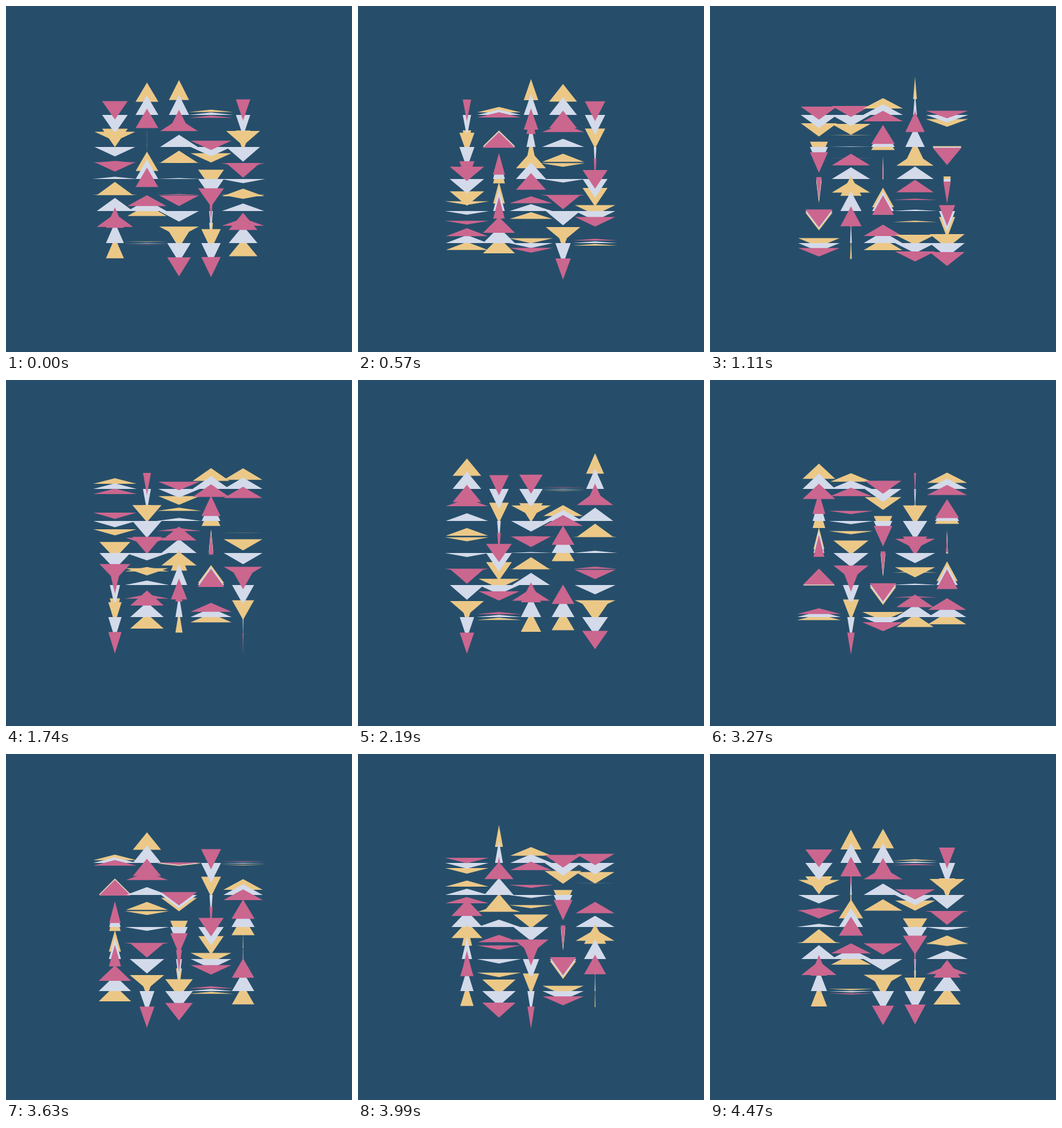
Recreate the animation shown at these times as an HTML page with a canvas. Size 540 by 540 pixels, loop 4500 ms.

```html
<!DOCTYPE html>
<html lang="en">
<head>
<meta charset="utf-8">
<title>Turning triangles</title>
<style>
  html, body { margin: 0; width: 100%; height: 100%; overflow: hidden; background: #264e6a; }
  canvas { display: block; }
</style>
</head>
<body>
<canvas id="stage" width="540" height="540"></canvas>
<script>
const ctx = document.getElementById('stage').getContext('2d');
const LOOP = 4500, GRID = 5, STEP = 50, FIRST = 170;
const RADIUS = 35, SPREAD = 25;
const COLORS = ['#ecc887', '#d3daea', '#cb668f'];
const rad = deg => deg * Math.PI / 180;

// Phases: each column leads by whole radians, each row by a fixed angle.
const COLUMN = [-3, -1, 0, 1, 3];
const START = rad(116.8), ROW_TURN = rad(30.4);
const SHIFT_START = rad(-4.5), ROW_SHIFT = rad(137.25);

function triangle(x, y, half, height, color) {
  ctx.fillStyle = color;
  ctx.beginPath();
  ctx.moveTo(x - half, y);
  ctx.lineTo(x + half, y);
  ctx.lineTo(x, y - height);
  ctx.fill();
}

function cell(col, row, turn) {
  const x = FIRST + col * STEP, y = FIRST + row * STEP;
  const angle = START + COLUMN[col] + row * ROW_TURN - turn;
  const shift = SPREAD * Math.sin(angle + SHIFT_START + row * ROW_SHIFT);
  const half = RADIUS * Math.cos(angle), height = RADIUS * Math.sin(angle);
  COLORS.forEach((color, i) => triangle(x, y + (i - 1) * shift, half, height, color));
}

function draw(time) {
  const turn = 2 * Math.PI * (time % LOOP) / LOOP;
  ctx.fillStyle = '#264e6a';
  ctx.fillRect(0, 0, 540, 540);
  for (let col = 0; col < GRID; col++)
    for (let row = 0; row < GRID; row++) cell(col, row, turn);
}

const begin = performance.now();
function tick() {
  draw(performance.now() - begin);
  requestAnimationFrame(tick);
}
tick();
</script>
</body>
</html>
```
